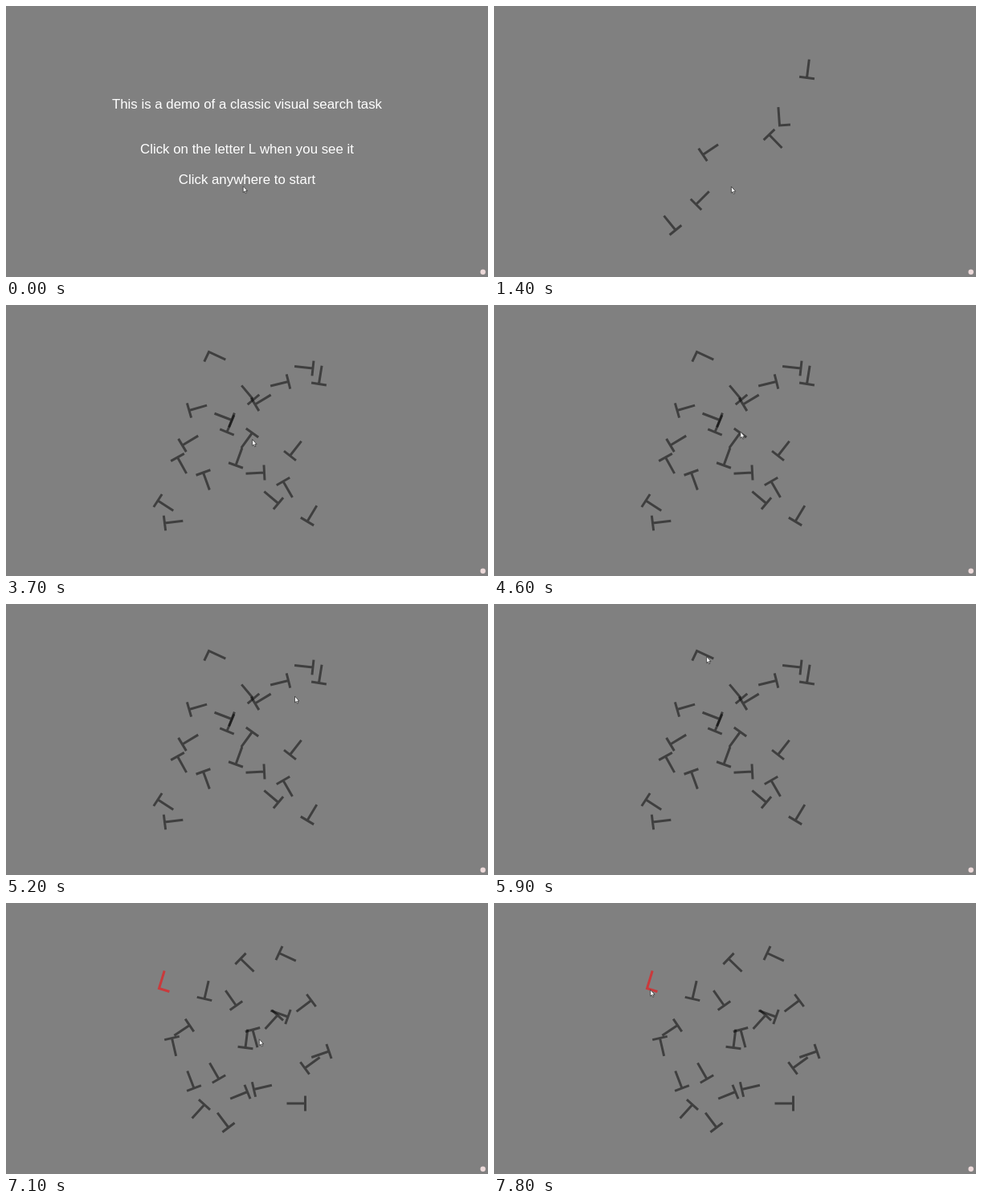
Recreate the animation shown at these times as an HTML page with a canvas. Size 600 px wide and 338 px high, loop 8000 ms.

```html
<!DOCTYPE html>
<html lang="en">
<head>
<meta charset="utf-8">
<title>Visual search demo</title>
<style>
  html, body { margin: 0; height: 100%; overflow: hidden; background: #808080; }
  canvas { display: block; }
</style>
</head>
<body>
<canvas width="600" height="338"></canvas>
<script>
const ctx = document.querySelector('canvas').getContext('2d');
const LOOP = 8000, STEP = 100, LINE = 18.8;
const DARK = 'rgba(0,0,0,.51)', RED = '#c93a3c';

// Letters as x, y, stem angle; the first of each set is the L.
const few = [
  355.5,149,-94, 389.5,89.5,-83, 342.5,160.5,46, 260,185.5,-34,
  251.5,247.5,-45, 226,279.5,-129
];
const many = [
  252.5,58.5,25, 382,79,-174, 389.5,98.5,-81, 351.5,95.5,166,
  308,118,-130, 310,124,-31, 228,131.5,-16, 281,143.5,-159,
  275,158.5,-67, 219.5,175,-31, 213.5,190,61, 245.5,209,70,
  189,244,33, 197.5,272,-7, 306.5,159.5,126, 286,200,-70,
  321.5,209,177, 353.5,188,-52, 339,247.5,-140, 345,220,60, 375,270,-59
];
const popOut = [
  190.5,106.5,-73, 292,69.5,44, 340,62.5,25, 247,119.5,-77,
  286.5,128,-125, 380,121.5,143, 338,140,132, 351,142,-160,
  298,180.5,-83, 307,158,75, 228.5,152.5,146, 206.5,168.5,77,
  234,231,-111, 265,219.5,-120, 247,251.5,132, 277,280,-127,
  300.5,235.5,158, 308.5,232.5,-13, 372.5,250,180, 402,185,161, 372,206,-36
];

// Pointer stops: time, x, y
const stops = [
  [0, 295.2, 224.6], [100, 295.2, 224.6], [200, 295.4, 225.2], [1600, 295.4, 225.2],
  [2400, 360, 146.6], [3100, 360, 146.6], [4000, 288, 175],
  [4600, 306.8, 158], [4900, 303, 142], [5300, 370, 110],
  [5800, 267.3, 75], [5900, 264.6, 65.6], [6000, 264.6, 65.6],
  [6500, 315.3, 169.8], [7300, 315.3, 169.8], [7800, 194.7, 108.2], [LOOP, 194.7, 108.2]
];

// Screens: start time, draw function
const screens = [
  [0, () => {
    text('This is a demo of a classic visual search task', -2.5);
    text('Click on the letter L when you see it', .5);
    text('Click anywhere to start', 2.5);
  }],
  [1400, () => letters(few)],
  [2600, () => result('1.243')],
  [3700, () => letters(many)],
  [6100, () => result('2.439')],
  [7100, () => letters(popOut, RED)]
];

function text(str, line) {
  ctx.fillStyle = '#fff';
  ctx.font = '16.85px "Liberation Sans", Arial, sans-serif';
  ctx.textAlign = 'center';
  ctx.fillText(str, 300, 175 + line * LINE);
}

function result(seconds) {
  text(`Target found! Speed: ${seconds} seconds`, 0);
}

function letters(set, targetColor = DARK) {
  ctx.lineWidth = 3;
  for (let i = 0; i < set.length; i += 3) {
    ctx.save();
    ctx.translate(set[i], set[i + 1]);
    ctx.rotate(set[i + 2] * Math.PI / 180);
    ctx.strokeStyle = i ? DARK : targetColor;
    ctx.beginPath();
    ctx.moveTo(23, 0);
    ctx.lineTo(0, 0);
    if (i) ctx.moveTo(0, -9.5);
    ctx.lineTo(0, i ? 9.5 : 13.5);
    ctx.stroke();
    ctx.restore();
  }
}

function pointerAt(t) {
  const i = stops.findIndex(s => s[0] > t);
  const [t0, x0, y0] = stops[i - 1], [t1, x1, y1] = stops[i];
  const u = (t - t0) / (t1 - t0), k = u * u * (3 - 2 * u);
  return [x0 + (x1 - x0) * k, y0 + (y1 - y0) * k];
}

function pointer(x, y) {
  const arrow = new Path2D('M0 0V8L1.8 6.4 3 9.2 4.3 8.6 3.1 6H5.4Z');
  ctx.save();
  ctx.translate(x, y);
  ctx.lineWidth = .8;
  ctx.strokeStyle = '#333';
  ctx.fillStyle = '#fff';
  ctx.fill(arrow);
  ctx.stroke(arrow);
  ctx.restore();
}

function badge() {
  ctx.fillStyle = '#ecd9d9';
  ctx.beginPath();
  ctx.arc(593.7, 331.8, 3.2, 0, 7);
  ctx.fill();
}

function draw(now) {
  const t = Math.floor(now % LOOP / STEP) * STEP;
  ctx.fillStyle = '#808080';
  ctx.fillRect(0, 0, 600, 338);
  screens.findLast(s => s[0] <= t)[1]();
  badge();
  pointer(...pointerAt(t));
  requestAnimationFrame(draw);
}
requestAnimationFrame(draw);
</script>
</body>
</html>
```
